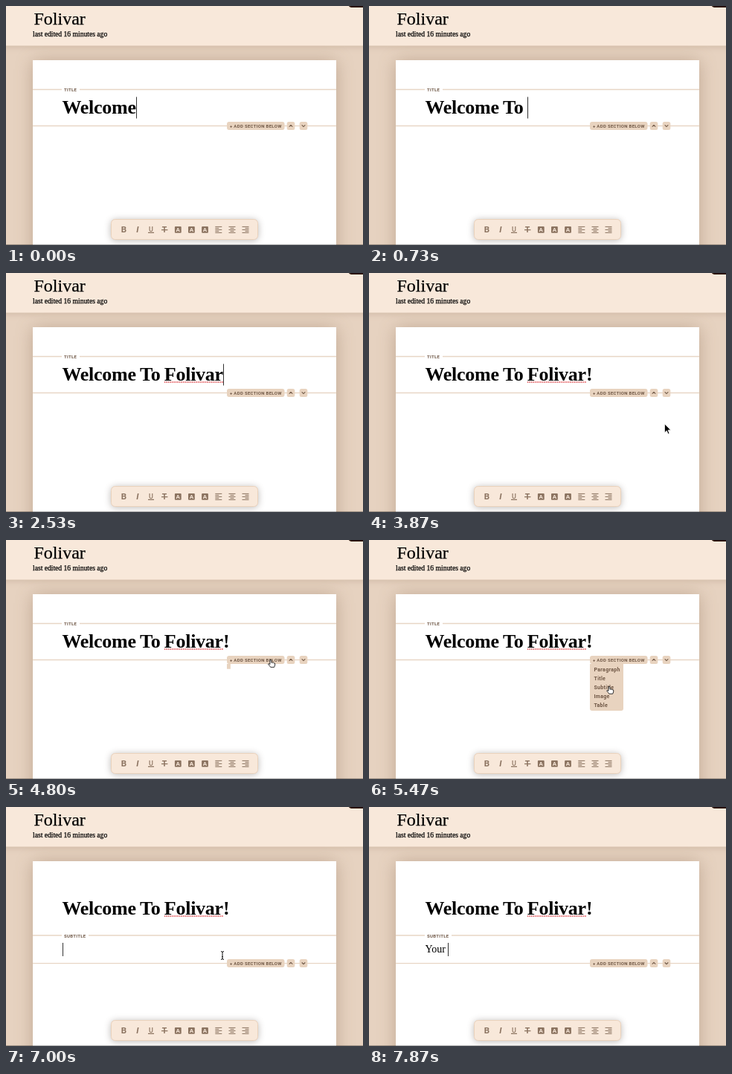
An HTML page for the animation above (8 s loop, 480x322 px).

```html
<!DOCTYPE html>
<html lang="en">
<head>
<meta charset="utf-8">
<title>Editor</title>
<style>
html, body { margin: 0; width: 100%; height: 100%; overflow: hidden; background: #e6d2c0; }
svg { display: block; width: 480px; height: 322px; }
text { white-space: pre; }
.serif { font-family: "Liberation Serif", serif; fill: #000; }
.head { stroke: #000; stroke-width: .25px; }
.ui { font-family: Roboto, sans-serif; font-weight: 700; fill: #6f5745; letter-spacing: .3px; }
.cap { font-size: 6px; }
.item { font-size: 7px; }
#title { font-size: 26px; font-weight: 700; letter-spacing: -.25px; word-spacing: -1px; }
#sub { font-size: 14px; }
.tool { font-family: Roboto, sans-serif; font-weight: 700; font-size: 11.5px; text-anchor: middle; fill: #8b7360; }
</style>
</head>
<body>
<svg id="stage" viewBox="0 0 480 322">
  <defs>
    <filter id="soft" x="-20%" y="-30%" width="140%" height="160%"><feGaussianBlur stdDeviation="12"/></filter>
    <filter id="near" x="-20%" y="-100%" width="140%" height="300%"><feGaussianBlur stdDeviation="5"/></filter>
    <clipPath id="menuClip"><rect id="menuBox" x="297" y="167"/></clipPath>
  </defs>
  <rect width="480" height="322" fill="#e6d2c0"/>
  <rect x="36" y="74" width="408" height="290" fill="#75543a" opacity=".34" filter="url(#soft)"/>
  <rect x="-20" y="20" width="520" height="35" fill="#75543a" opacity=".2" filter="url(#near)"/>
  <rect width="480" height="53.5" fill="#f8e8da"/>
  <path d="M461 0H480V2H466Q462 2 461 0Z" fill="#2a1509"/>
  <text class="serif head" x="37.5" y="25" font-size="24">Folivar</text>
  <text class="serif head" x="36" y="41" font-size="9.6">last edited 16 minutes ago</text>
  <rect x="36" y="73" width="408" height="249" fill="#fff"/>

  <g id="oldSection"></g>
  <g id="newSection"></g>
  <g id="menu" clip-path="url(#menuClip)">
    <path d="M297 167H342V227Q342 230 339 230H300Q297 230 297 227Z" fill="#e8d3bf"/>
  </g>

  <text id="title" class="serif" x="75.5" y="145"></text>
  <path id="squiggle" fill="none" stroke="#e0454a" stroke-width="1.5" stroke-dasharray="1.5 1"/>
  <text id="sub" class="serif" x="75.5" y="196"></text>
  <rect id="caret" width="1" fill="#333"/>

  <rect y="321" width="480" height="1" opacity=".3"/>
  <rect x="141" y="288" width="198" height="28" rx="6" fill="#5c5048" opacity=".4" filter="url(#near)"/>
  <rect x="141.5" y="287.5" width="197" height="27" rx="5" fill="#f8e8da" stroke="#ead2bc"/>
  <g id="tools"></g>

  <g id="mouse">
    <path id="arrow" d="M0 0V12L2.8 9.4L4.7 13.8L6.5 13L4.7 8.7H8.5Z" fill="#000" stroke="#fff" stroke-width=".8"/>
    <path id="hand" transform="scale(1 .92)" d="M-1 .4Q0-.8 1 .4V4Q2 3.2 2.8 4.2Q3.8 3.6 4.4 4.6Q5.8 4.4 5.8 6Q5.9 8 4.7 10.6H-.2Q-1.2 8.6-3.2 6.6Q-3.4 5-2 5.6L-1 6.4Z" fill="#fff" stroke="#111" stroke-width=".9" stroke-linejoin="round"/>
    <path id="beam" d="M-2-5.5Q0-5.5 0-4Q0-5.5 2-5.5M0-4V4M-2 5.5Q0 5.5 0 4Q0 5.5 2 5.5M-1 1.8H1" fill="none" stroke="#111"/>
  </g>
</svg>
<script>
const LOOP = 8000;
const $ = id => document.getElementById(id);
const clamp = v => Math.max(0, Math.min(1, v));
const ramp = (t, start, dur) => clamp((t - start) / dur);
const smooth = p => p * p * (3 - 2 * p);
const show = (el, on) => el.setAttribute('visibility', on ? 'visible' : 'hidden');
const set = (el, attrs) => { for (const k in attrs) el.setAttribute(k, attrs[k]); };

// A labelled section with two rules and its buttons
function section(label, top, bottom, gapEnd) {
  const chevron = (x, dir) => `<rect x="${x - 5.3}" y="${bottom - 5.5}" width="10.6" height="11" rx="2.5" fill="#e8d3bf"/>
    <path d="M${x - 2.3} ${bottom + dir}L${x} ${bottom - dir}L${x + 2.3} ${bottom + dir}" fill="none" stroke="#6f5745" stroke-width="1.1"/>`;
  return `<path d="M36 ${top}H75M${gapEnd} ${top}H444M36 ${bottom}H444" stroke="#e8d6c5" stroke-width="1.3"/>
    <text class="ui cap" x="78" y="${top + 2.8}">${label}</text>
    <rect x="297" y="${bottom - 5.5}" width="77.5" height="11" rx="3" fill="#e8d3bf"/>
    <text class="ui cap" x="301" y="${bottom + 2.2}">+ ADD SECTION BELOW</text>
    ${chevron(383, 1.1)}${chevron(400, -1.1)}`;
}
$('oldSection').innerHTML = section('TITLE', 112.5, 161.5, 99);
$('newSection').innerHTML = section('SUBTITLE', 173, 210.6, 111);

$('menu').innerHTML += ['Paragraph', 'Title', 'Subtitle', 'Image', 'Table']
  .map((s, i) => `<text class="ui item" x="302.5" y="${177 + i * 12.1}">${s}</text>`).join('');

const glyph = (x, s, extra = '') => `<text class="tool" x="${x}" y="305.4" ${extra}>${s}</text>`;
const boxed = x => `<rect x="${x - 4.4}" y="297" width="8.8" height="8.8" rx="1" fill="#8b7360"/>
  <text class="tool" x="${x}" y="304.3" style="font-size:8px;fill:#f8e8da">A</text>`;
const bars = (x, offset) => [0, 1, 2, 3, 4].map(i => {
  const w = i % 2 ? 5 : 9;
  return `<rect x="${x - w / 2 + (i % 2 ? offset : 0)}" y="${296.9 + i * 2}" width="${w}" height="1" fill="#8b7360"/>`;
}).join('');
$('tools').innerHTML = glyph(158.3, 'B') + glyph(177, 'I', 'font-style="italic"')
  + `<text class="tool" x="195" y="303.7" style="font-size:9px;font-weight:500">U</text>
     <path d="M191 305.4H199M209 301.6H217.4" stroke="#8b7360" stroke-width="1.1"/>`
  + `<text class="tool" x="213" y="305.2" style="font-size:10.5px">T</text>`
  + [231.3, 249.4, 267.5].map(boxed).join('')
  + bars(285.8, -2) + bars(304, 0) + bars(322, 2);

const TITLE = 'Welcome To Folivar!', SUB = 'Your ';
const titleKeys = [70, 330, 600, 730, 1070, 1530, 1800, 2000, 2200, 2400, 2530, 2930];
const subKeys = [7200, 7400, 7470, 7670, 7870];
const WORD = 11, WORD_END = 18;
const typed = (keys, t) => keys.filter(k => k <= t).length;

// time, x, y of the pointer's hot spot
const path = [
  [3440, 465, 262], [3600, 404, 209], [3770, 404, 209], [4200, 357, 167], [4440, 357, 167],
  [4530, 356, 161.5], [4780, 356, 161.5], [5470, 323, 197.5], [5800, 323, 197.5], [6470, 291, 200]
];
function pointer(t) {
  let i = 0;
  while (i < path.length - 2 && t > path[i + 1][0]) i++;
  const [a, b] = [path[i], path[i + 1]];
  const p = smooth(ramp(t, a[0], b[0] - a[0]));
  return [a[1] + (b[1] - a[1]) * p, a[2] + (b[2] - a[2]) * p];
}

function write(el, s) {
  s = s.replace(/ /g, '\u00a0');
  if (el.textContent !== s) el.textContent = s;
  return s ? el.getComputedTextLength() : 0;
}

function drawText(t) {
  const n = 7 + typed(titleKeys, t), m = typed(subKeys, t);
  const titleW = write($('title'), TITLE.slice(0, n));
  const subW = write($('sub'), SUB.slice(0, m));

  const marked = t >= 2000 && n > WORD;
  show($('squiggle'), marked);
  if (marked) {
    const x = 75.5 + $('title').getSubStringLength(0, WORD);
    const w = $('title').getSubStringLength(WORD, Math.min(n, WORD_END) - WORD);
    $('squiggle').setAttribute('d', `M${x} 147H${x + w}`);
  }

  const inSub = t >= 5930;
  const starts = inSub ? [5930, ...subKeys] : [0, ...titleKeys];
  const last = starts.filter(k => k <= t).pop();
  const blinkOn = Math.floor((t - last) / 520) % 2 === 0;
  show($('caret'), blinkOn && (inSub || t < 4450));
  set($('caret'), inSub
    ? { x: Math.round(75.5 + subW), y: 183, height: 18 }
    : { x: Math.round(75.5 + titleW), y: 122.5, height: 29 });
}

function draw(t) {
  drawText(t);

  const fade = ramp(t, 5770, 270);
  const out = Math.pow(1 - fade, 2.4);
  $('oldSection').setAttribute('opacity', out);
  $('newSection').setAttribute('opacity', ramp(t, 5770, 100));

  const open = t < 5770 ? smooth(ramp(t, 4750, 250)) : 1 - fade;
  set($('menuBox'), { width: 45 * open, height: 63 * open });
  $('menu').setAttribute('opacity', out);

  const [x, y] = pointer(t);
  $('mouse').setAttribute('transform', `translate(${x} ${y})`);
  show($('arrow'), t >= 3450 && t < 4130);
  show($('hand'), t >= 4130 && t < 5790);
  show($('beam'), t >= 5790 && t < 7130);
}

function frame() {
  draw(performance.now() % LOOP);
  requestAnimationFrame(frame);
}
frame();
</script>
</body>
</html>
```
